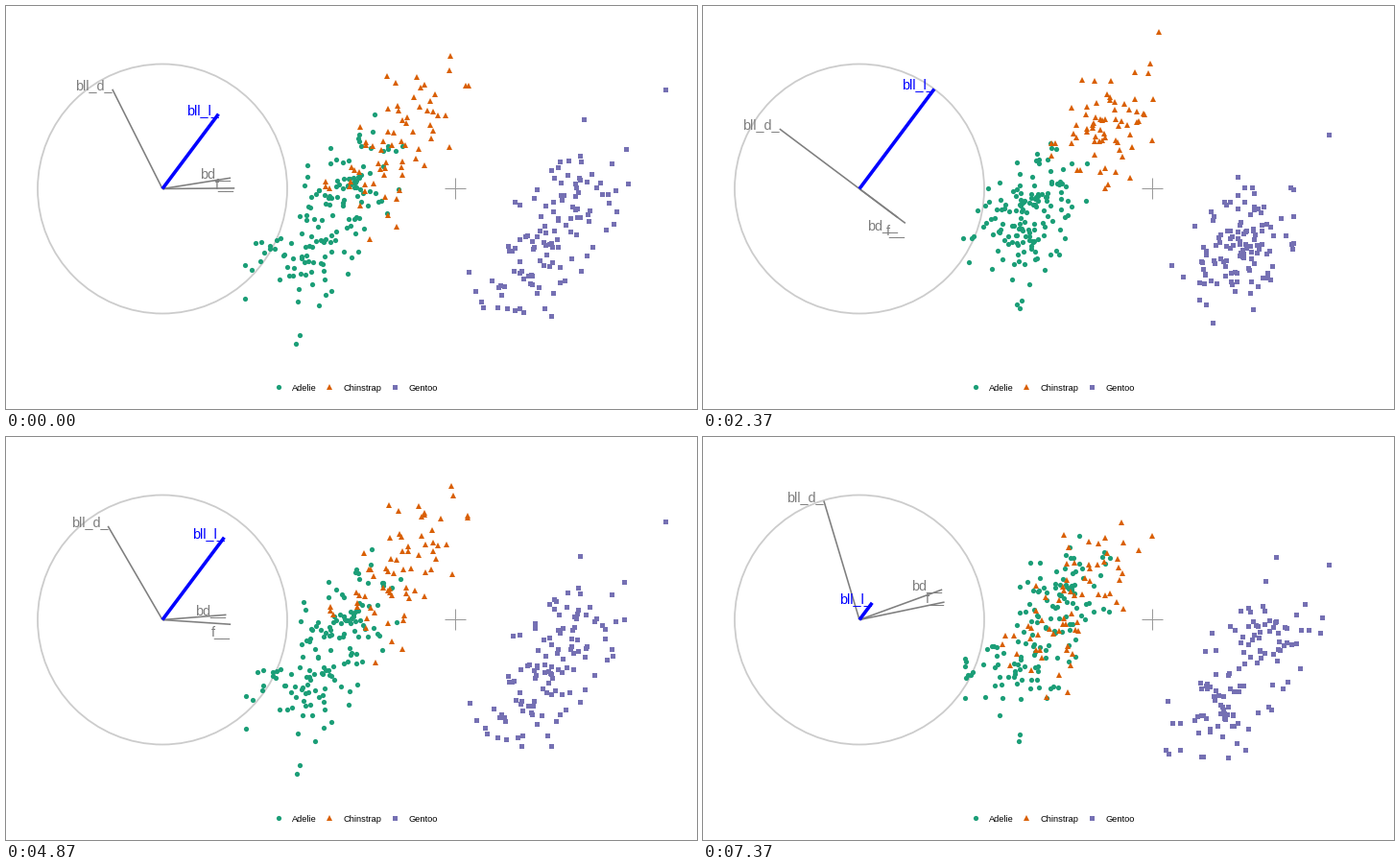
A matplotlib script that plays this animation: 720 px wide and 420 px high, repeating every 8000 ms.

```python
import numpy as np
import matplotlib.pyplot as plt
from matplotlib.animation import FuncAnimation
from matplotlib.patches import Circle

W, H, DPI = 720, 420, 80
PT = 72 / DPI                      # points per pixel
STEP_MS, LOOP_MS = 50, 8000
TURN = 0.2                         # radians per turn of the view
TURN_MS = 625
START = 0.724                      # first tilt of the bill axis

HUB = np.array([163, 190])         # centre of the axis circle
RADIUS = 130
ZERO = np.array([468, 190])        # origin of the projected data
SCALE = 67.1                       # pixels per standard deviation
SHIFT = np.array([-36.5, 15])      # offset along U and V

# Screen directions: bill length lies along U; V does not change with tilt
U, V = np.array([0.6, 0.8]), np.array([-0.8, 0.6])

# All 3D positions are (bill, body, side): bill and body share U, side is V.
AXES = [("bll_d_", (0, 0.60, 0.80)), ("f__", (0, 0.53, -0.46)),
        ("bd__", (0, 0.60, -0.385)), ("bll_l_", (1, 0, 0))]

# Each species is a female and a male cloud around its centre, plus one
# bird far out
SEX = np.array([0.34, 0.58, 0.04])
SPREAD = np.array([0.41, 0.45, 0.34])
SPECIES = [
    ("Adelie", 146, "#1B9E77", "o", 5.2, 284,
     (-0.95, -0.42, 1.07), (-2.18, -1.86, 0.31)),
    ("Chinstrap", 68, "#D95F02", "^", 5.8, 337,
     (0.88, -0.17, 0.91), (2.56, -0.94, 1.15)),
    ("Gentoo", 119, "#7570B3", "s", 5, 405,
     (0.65, 0.61, -1.84), (2.86, 2.42, -1.91)),
]

rng = np.random.default_rng(7)


def cloud(n, centre, far):
    z = rng.standard_normal((n, 3))
    z = np.clip((z - z.mean(axis=0)) / z.std(axis=0), -2.1, 2.1)
    z[:, 1] = 0.3 * z[:, 0] + 0.95 * z[:, 1]
    sex = np.where(np.arange(n) % 2, 1, -1)[:, None]
    birds = centre + sex * SEX + z * SPREAD
    birds[0] = far
    return birds


def tilt(ms):
    """Angle of the bill axis out of the screen: down to 0, a rest, up."""
    k = (ms + 150) // TURN_MS
    return max(START - TURN * k, TURN * (k - 5), 0)


def project(points, phi, origin, scale, shift=(0, 0)):
    bill, body, side = np.transpose(points)
    u = (bill * np.cos(phi) + body * np.sin(phi)) * scale + shift[0]
    v = side * scale + shift[1]
    return origin + (np.outer(u, U) + np.outer(v, V)) * (1, -1)


fig = plt.figure(figsize=(W / DPI, H / DPI), dpi=DPI, facecolor="white")
ax = fig.add_axes([0, 0, 1, 1])
ax.set_xlim(0, W)
ax.set_ylim(H - 0.5, -0.5)
ax.axis("off")


def segment(xs, ys, color, width):
    line, = ax.plot(xs, ys, color=color, lw=width * PT, zorder=2,
                    solid_capstyle="butt")
    return line


def dots(xs, ys, color, marker, size):
    line, = ax.plot(xs, ys, color=color, ls="none", marker=marker,
                    ms=size * PT, mew=0, zorder=5, antialiased=False)
    return line


def write(x, y, text, color, px, ha):
    return ax.text(x, y, text, color=color, fontsize=px * PT, ha=ha,
                   va="baseline", fontfamily="Liberation Sans", zorder=4)


ax.add_patch(Circle(HUB, RADIUS, fill=False, ec="#CCCCCC", lw=1.8 * PT))
segment([457, 479], [190, 190], "#999999", 1)
segment([468, 468], [179, 201], "#999999", 1)

clouds = []
for name, n, color, marker, size, x, centre, far in SPECIES:
    clouds.append((cloud(n, centre, far), dots([], [], color, marker, size)))
    dots([x], [397], color, marker, size)
    write(x + 14, 401, name, "black", 9.3, "left")

arms = []
for text, _ in AXES:
    main = text == "bll_l_"
    color = "#0000FF" if main else "#7F7F7F"
    arms.append((segment([], [], color, 3.6 if main else 1.6),
                 write(0, 0, text, color, 14.4, "right")))


def draw(i):
    phi = tilt(i * STEP_MS)
    tips = project([axis for _, axis in AXES], phi, HUB, RADIUS)
    for (x, y), (line, label) in zip(tips, arms):
        line.set_data([HUB[0], x], [HUB[1], y])
        label.set_position((x, y if y <= HUB[1] else y + 12))
    for birds, points in clouds:
        points.set_data(*project(birds, phi, ZERO, SCALE, SHIFT).T)
    return []


anim = FuncAnimation(fig, draw, frames=LOOP_MS // STEP_MS,
                     interval=STEP_MS, repeat=True, repeat_delay=0,
                     init_func=lambda: draw(0))
plt.show()
```
